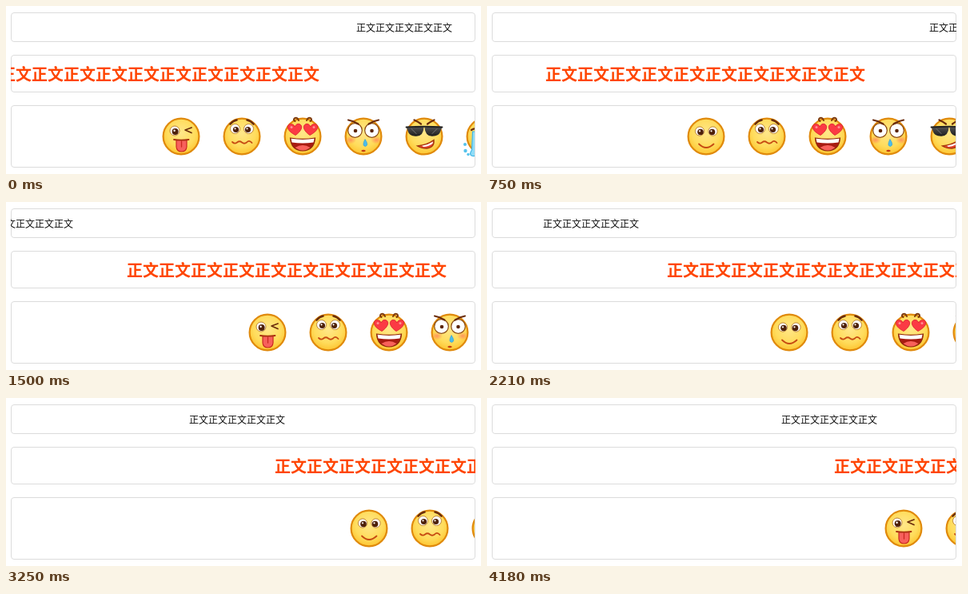
Write an HTML page that moves like this. It is 594 by 210 pixels and loops after 4.28 s.

```html
<!DOCTYPE html>
<html lang="zh-CN">
<head>
<meta charset="utf-8">
<title>Marquee rows</title>
<style>
  html, body { margin: 0; width: 100%; height: 100%; overflow: hidden; background: #fff; }
  .row { position: absolute; left: 6px; width: 581px; overflow: hidden; white-space: nowrap;
    font-family: "Noto Sans CJK SC", "Noto Sans CJK", sans-serif; }
  .row::before { content: ""; position: absolute; inset: 0; box-sizing: border-box;
    border: 1px solid #dcdcdc; border-radius: 4px; }
  .row > span { position: absolute; left: 0; top: 0; }
  #small { top: 8px; height: 37px; font-size: 12px; line-height: 37px; color: #111; }
  #large { top: 61px; height: 47px; font-size: 20px; line-height: 47px; font-weight: 700; color: #ff4500; }
  #faces { top: 124px; height: 78px; }
  #faces svg { position: absolute; left: 1px; top: 0; width: 579px; height: 78px; }
  .line { fill: none; stroke-linecap: round; stroke-linejoin: round; }
</style>
</head>
<body>
<div class="row" id="small"><span>正文正文正文正文正文</span></div>
<div class="row" id="large"><span>正文正文正文正文正文正文正文正文正文正文</span></div>
<div class="row" id="faces">
  <svg viewBox="7 124 579 78">
    <defs>
      <radialGradient id="skin" cx=".5" cy=".4" r=".6">
        <stop offset="0" stop-color="#ffe78a"/>
        <stop offset=".65" stop-color="#ffdc5c"/>
        <stop offset="1" stop-color="#fdc531"/>
      </radialGradient>
      <radialGradient id="blush">
        <stop offset="0" stop-color="#ff8a5c" stop-opacity=".85"/>
        <stop offset="1" stop-color="#ff8a5c" stop-opacity="0"/>
      </radialGradient>
      <linearGradient id="lens" x2="0" y2="1">
        <stop offset="0" stop-color="#555"/>
        <stop offset="1" stop-color="#1d1d1d"/>
      </linearGradient>
    </defs>
    <g id="train"></g>
  </svg>
</div>
<script>
const LOOP = 4280, GAP = 76, BROWN = '#6b2d0c', LIP = '#c64a12';

// Redraw moments: first, last, count
const runs = [[60, 580, 10], [640, 1160, 10], [1220, 1730, 10], [1790, 2270, 9],
  [2320, 2840, 10], [2890, 3370, 9], [3430, 3950, 10], [4010, 4180, 4]];
const ticks = [0];
for (const [a, b, n] of runs)
  for (let i = 0; i < n; i++) ticks.push(Math.floor((a + (b - a) * i / (n - 1)) / 10 + 1e-6) * 10);

// Shared scroll progress: time, fraction
const marks = [[0, 0], [750, .1828], [1500, .359], [2210, .527], [2840, .6828], [3250, .779], [4180, 1]];

const line = (d, color, w) => `<path class="line" d="${d}" stroke="${color}" stroke-width="${w}"/>`;
const shape = (d, fill, more = '') => `<path d="${d}" fill="${fill}" ${more}/>`;
const dot = (x, y, r, fill, more = '') => `<circle cx="${x}" cy="${y}" r="${r}" fill="${fill}" ${more}/>`;
const eye = (x, y, r, px, py, pr) =>
  dot(x, y, r, '#fff', 'stroke="#b87a26" stroke-width=".9"') +
  dot(x + px, y + py, pr, '#4e2109') + dot(x + px - 1, y + py - 1.2, pr * .3, '#fff');
const head = dot(0, 0, 22.4, 'url(#skin)', 'stroke="#e08a0c" stroke-width="2.2"');
const mirror = s => s + `<g transform="scale(-1 1)">${s}</g>`;

const smile = eye(-8, -6.5, 5.6, 1, 1, 3.8) + eye(8.5, -6.5, 5.6, -1, 1, 3.8) +
  line('M-9 9.5Q0 18.5 9.5 9.5', LIP, 1.8);

const tongue = eye(-8, -7, 6, .6, 1, 4) +
  line('M13 -11L5 -8L13 -4.5', BROWN, 1.7) +
  shape('M-6 4.5H7V13Q6.5 19 .5 19Q-5.5 19 -6 13Z', '#f7605c', 'stroke="#c92a20" stroke-width="1.2"') +
  line('M.5 6V13', '#c92a20', 1.3) + line('M-9 4Q0 5.4 9.5 4', '#a9300f', 1.8);

const worried = eye(-8.5, -9.5, 6, 1, 1, 3.6) + eye(8.5, -9.5, 6, -1, 1, 3.6) +
  mirror(line('M-14.5 -15.5Q-11 -19.5 -6.5 -20.5', BROWN, 2.6)) +
  line('M-12 7Q-9 10 -6 7.5T0 7.5T6 7.5Q9 4 12.5 8', LIP, 1.8);

const love = mirror(line('M-5 -20Q-7 -25 -10.5 -22.5Q-12 -20.5 -9.5 -19', '#7d3a0c', 2) +
    shape('M-9 -1.5C-22 -8 -20 -16 -14.5 -15.5Q-11 -15.5 -9.8 -12Q-8 -16.5 -4 -15.5C1.5 -13 -2 -6 -9 -1.5Z',
      '#fb3a44', 'stroke="#d81f2c" stroke-width=".8"') + dot(-14, -11.5, 1.5, '#ff8f92')) +
  shape('M-15.5 2Q0 4.5 15.5 2Q14.5 17.5 0 18Q-14.5 17.5 -15.5 2Z', '#a81c12', 'stroke="#8e2a0a" stroke-width="1.2"') +
  shape('M-14.5 2.8Q0 5 14.5 2.8L13.5 7.5Q0 9.5 -13.5 7.5Z', '#fff') +
  shape('M-9.5 14Q0 8 9.5 14Q5 17.5 0 17.4Q-5 17.4 -9.5 14Z', '#f8615a');

const shy = mirror(`<ellipse cx="-16" cy="4.5" rx="7" ry="5" fill="url(#blush)"/>` +
    dot(-10.5, -7.5, 8.8, '#fff', 'stroke="#8a4a12" stroke-width="1.2"') +
    line('M-19 -20.5Q-13 -19.5 -6.5 -15.5', BROWN, 2.2)) +
  dot(-10, -7, 2.3, '#5b2508') + dot(10.5, -7, 2.3, '#5b2508') +
  shape('M2 3.5Q7 11 2.5 12.5Q-2.5 12 2 3.5Z', '#4bbcec', 'stroke="#2a9bd2" stroke-width=".6"') +
  shape('M-3 18Q0 15.5 3 18Q0 20.5 -3 18Z', '#c43c12');

const cool = mirror(line('M-12.5 -20.5Q-8 -18.5 -4 -15.5', BROWN, 2.2) +
    shape('M-22.5 -12Q-12 -13 -.5 -11.5Q-1 -.5 -9.5 -.3Q-19 0 -20.5 -7Z', 'url(#lens)') +
    line('M-16 -9.5L-10 -3.5', '#777', 1)) +
  line('M-22.5 -11.5Q0 -13 22.5 -11.5', '#222', 1.8) +
  shape('M-8.5 12Q4 10.5 12 4.5Q13 14 3 15Q-4 15 -8.5 12Z', '#e4402c', 'stroke="#a33a0d" stroke-width="1.4"') +
  shape('M-3 11.8Q5 10.5 11 6.5L10.5 9Q5 13 -1 13Z', '#fff');

const cry = mirror(line('M-17 -8Q-11 -12 -6 -6', BROWN, 2.2) +
    shape('M-15.5 -6H-8.5Q-9 8 -8 21Q-12 26 -17 24Q-20 22 -16.5 17Z', '#8fdcf7', 'stroke="#3fb4e4" stroke-width="1.2"') +
    dot(-25, 10, 2, '#56c3ec') + dot(-24.5, 18, 2.2, '#56c3ec') + dot(-21, 22.5, 1.7, '#56c3ec')) +
  shape('M-7 8Q0 2 7 8Q6 16 0 16Q-6 16 -7 8Z', '#b32a16');

const train = document.getElementById('train');
train.innerHTML = [`<g id="grin">${smile}</g><g id="tease">${tongue}</g>`, worried, love, shy, cool, cry]
  .map((face, i) => `<g transform="translate(${i * GAP} 0)">${head}${face}</g>`).join('');

const small = document.querySelector('#small span');
const large = document.querySelector('#large span');
const grin = document.getElementById('grin');
const tease = document.getElementById('tease');

function progress(t) {
  let i = 1;
  while (i < marks.length - 1 && marks[i][0] < t) i++;
  const [t0, p0] = marks[i - 1], [t1, p1] = marks[i];
  return p0 + (p1 - p0) * (t - t0) / (t1 - t0);
}

function draw(now) {
  const time = now % LOOP;
  const t = ticks.findLast(k => k <= time);
  const p = progress(t);
  const move = (el, x) => { el.style.transform = `translateX(${Math.round(x)}px)`; };
  // The small text leaves on the right and re-enters from the left
  move(small, (432 + 631 * p + 120) % 701 - 120);
  move(large, -14 + 442 * p);
  train.setAttribute('transform', `translate(${Math.round(219 + 302 * p)} 163)`);
  const beat = t * 3 / LOOP % 1;
  const smiling = beat > .25 && beat < .75;
  grin.style.display = smiling ? '' : 'none';
  tease.style.display = smiling ? 'none' : '';
}

const start = performance.now();
function loop() {
  draw(Math.max(0, performance.now() - start));
  requestAnimationFrame(loop);
}
loop();
</script>
</body>
</html>
```
